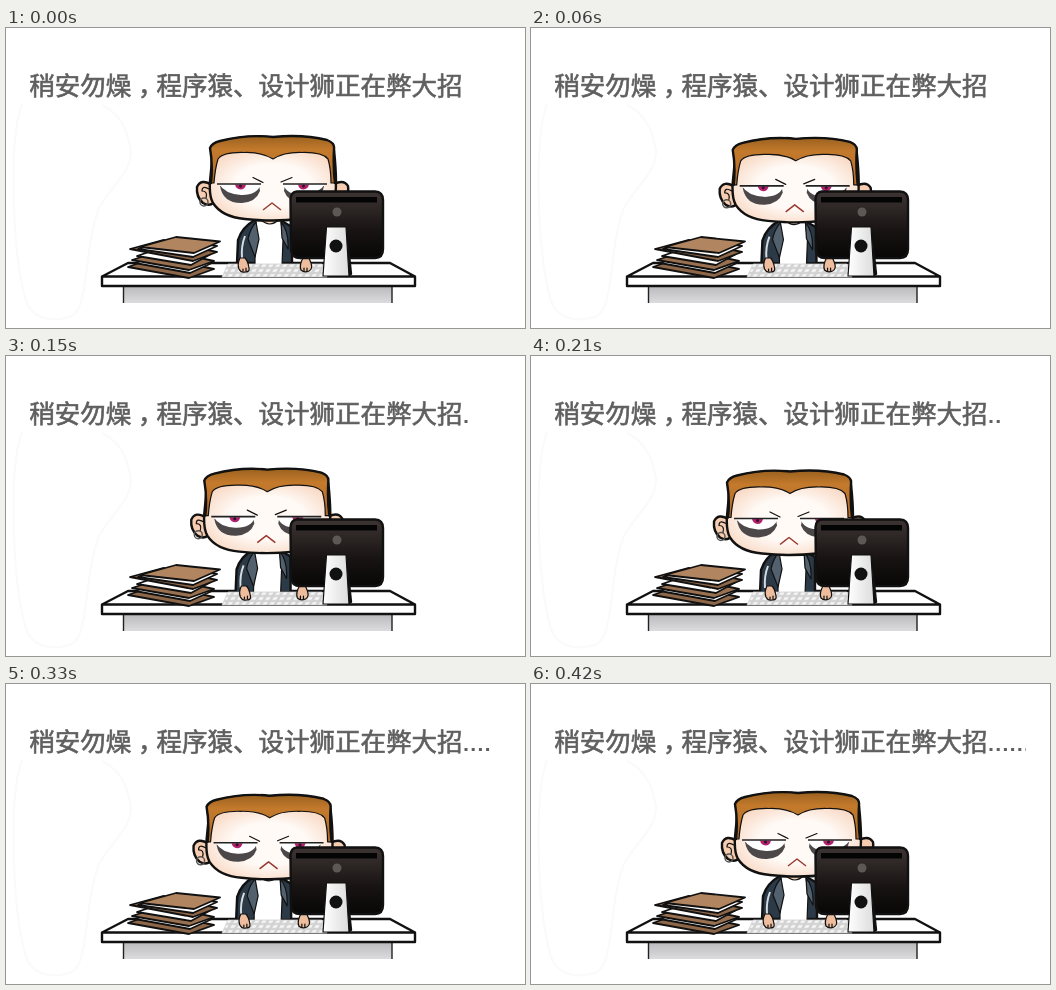
An HTML page for the animation above (450 ms loop, 519x300 px).

```html
<!DOCTYPE html>
<html lang="zh-CN">
<head>
<meta charset="utf-8">
<style>
html, body { margin: 0; height: 100%; overflow: hidden; background: #fff; }
svg { display: block; width: 519px; height: 300px; }
text { font: 500 25.5px "Noto Sans CJK SC", "Noto Sans CJK", sans-serif; fill: #5f5f5f; stroke: #5f5f5f; stroke-width: .65px; }
.ink, .thin { stroke: #111; stroke-linejoin: round; stroke-linecap: round; }
.ink { stroke-width: 2.4; }
.thin { stroke-width: 1.2; }
</style>
</head>
<body>
<svg viewBox="0 0 519 300" fill="none">
  <defs>
    <linearGradient id="hair" x2="0" y2="1">
      <stop stop-color="#9a611f"/><stop offset=".3" stop-color="#c47a2c"/><stop offset="1" stop-color="#b36a28"/>
    </linearGradient>
    <radialGradient id="skin" cx=".5" cy=".5" r=".6">
      <stop offset=".5" stop-color="#fffaf6"/><stop offset="1" stop-color="#f8d6c0"/>
    </radialGradient>
    <linearGradient id="panel" x2="0" y2="1">
      <stop stop-color="#b9b9bb"/><stop offset="1" stop-color="#dcdcde"/>
    </linearGradient>
    <linearGradient id="screen" x2="0" y2="1">
      <stop stop-color="#3d3533"/><stop offset=".6" stop-color="#171312"/><stop offset="1" stop-color="#080606"/>
    </linearGradient>
    <linearGradient id="stand"><stop stop-color="#fff"/><stop offset="1" stop-color="#dcdcdc"/></linearGradient>
    <pattern id="keys" width="7" height="5" patternUnits="userSpaceOnUse" patternTransform="skewX(-30)">
      <path fill="#d2d2d2" d="M0 0h7v5H0z"/><path fill="#f4f4f4" d="M1 1h4v3H1z"/>
    </pattern>
    <clipPath id="textArea"><path d="M0 30H495V85H0z"/></clipPath>
  </defs>

  <path stroke="#fafafa" stroke-width="2" d="M16 76C3 110 6 215 18 266C23 290 43 296 66 288C84 276 77 222 93 180C106 156 125 146 125 123C121 98 112 85 96 77"/>

  <g clip-path="url(#textArea)">
    <text x="23.200" y="67">稍安勿燥</text>
    <text x="132" y="67">，</text>
    <text x="150.500" y="67">程序猿、设计狮正在弊大招</text>
    <g id="dots" fill="#5f5f5f"></g>
  </g>

  <path fill="url(#panel)" d="M117 258H386V275H117z"/>
  <path stroke="#222" stroke-width="1.400" d="M117.500 259V275M386 259V275"/>
  <path class="ink" fill="#fff" d="M122 235H384L409 248.500V258H96V248.500zM96 248.500H409"/>

  <g class="ink" style="stroke-width: 1.8px">
    <path fill="#8d6748" d="M122 239L150 229L208 241L183 250z"/>
    <path fill="#fff" d="M129 235L155 226L206 235L184 245z"/>
    <path fill="#9a7150" d="M126 232L157 222L208 233L183 242z"/>
    <path fill="#fff" d="M131 228L158 219L205 226L185 237z"/>
    <path fill="#8d6748" d="M124 221L157 212L211 224L187 233z"/>
    <path fill="#fff" d="M132 221L166 211L211 218L187 229z"/>
    <path fill="#b18560" d="M134 219L170 209L214 213.500L188 225z"/>
  </g>

  <g id="body">
    <path class="ink" fill="#2c3947" d="M249 192Q236 199 232 212L231 235H250L256 197zM274 192L286 199V235H274z"/>
    <path fill="#fff" class="thin" d="M250 193H275L277 212L276 237H249L249 214z"/>
    <path fill="#f3d2b8" class="thin" d="M254 191H273Q264 201 254 191z"/>
    <path stroke="#d3dce0" stroke-width="2" d="M239 208Q235 218 236 230"/>
    <path class="thin" fill="#52616d" d="M250 194Q244 201 242 211L249 229L253 211zM275 194Q283 203 282 221L276 210z"/>
  </g>

  <path fill="url(#keys)" stroke="#cdcdcd" stroke-width=".7" d="M222 236H316L321 249H216z"/>
  <g id="leftHand">
    <path class="thin" fill="#eebd9e" d="M234 230Q231 236 233 241Q235 245 239 244Q244 244 243 240Q242 233 239 230z"/>
    <path class="thin" d="M237 241V243M240 240V243"/>
  </g>
  <g id="rightHand">
    <path class="thin" fill="#eebd9e" d="M297 230Q293 237 295 242Q298 245 303 243Q307 241 305 235L303 230z"/>
    <path class="thin" d="M298 240V243M301 240V243"/>
  </g>

  <g id="head">
    <path class="ink" fill="#f6cdb0" d="M206 157Q195 150 191 159Q190 169 197 175Q204 179 208 174z"/>
    <path class="thin" d="M203 161Q196 157 196 163Q202 163 200 170"/>
    <circle cx="198" cy="174" r="4" stroke="#555" stroke-width="1.500"/>
    <path class="ink" fill="#f6cdb0" d="M328 156Q338 151 342 158Q344 170 329 178z"/>
    <path class="ink" fill="url(#skin)" d="M207 122L204 153Q203 168 207 175Q216 189 239 191Q267 194 294 191Q322 188 328 174Q332 160 328 122z"/>
    <path class="thin" fill="url(#hair)" d="M205 155Q207 137 204 120Q206 115 214 113Q241 106 267 109Q297 106 321 112Q329 115 328 121Q327 140 329 155L325 155Q325 141 322 131Q316 124 296 124.500Q278 124 267 131Q256 124 238 124.500Q217 124 212 131Q209 141 208 155z"/>
    <path class="ink" d="M205 155Q207 137 204 120Q206 115 214 113Q241 106 267 109Q297 106 321 112Q329 115 328 121Q327 140 329 155"/>
    <g id="eye">
      <path fill="#4c4748" d="M214 158Q217 175.500 236 175Q250 174 254 163L253 157z"/>
      <path fill="#fff" d="M213 156H255Q251 167.500 235 167Q219 166 213 156z"/>
      <path fill="#b3206f" d="M229 156.500H240Q239 161.500 234.500 161.500Q230 161 229 156.500z"/>
      <circle cx="234.500" cy="158" r="1.500" fill="#351027"/>
      <path stroke="#222" stroke-width="1.600" d="M211 156H255"/>
    </g>
    <use href="#eye" transform="matrix(-1 0 0 1 532 0)"/>
    <path class="thin" d="M247 149.500L257 154.500M275 154L286 149.500"/>
    <path stroke="#9a3a30" stroke-width="1.500" stroke-linejoin="round" d="M257 182L266 175L275 182"/>
  </g>

  <path class="ink" fill="url(#screen)" d="M291 163.500H369Q377 164 377 172V221Q377 230 369 230H294Q286 230 285 222L284.500 171Q285 164 291 163.500z"/>
  <path fill="#050404" d="M290 169H371V174.500H290z"/>
  <circle cx="331" cy="184" r="4.500" fill="#5d5856"/>
  <path class="ink" fill="#111" d="M340 200L345 246L341 248z"/>
  <path class="thin" fill="url(#stand)" d="M320.500 199H340L343 248H317z"/>
  <circle cx="330" cy="218" r="6.500" fill="#111"/>
</svg>
<script>
const LOOP = 450, STEP = 30;
const byId = id => document.getElementById(id);
const shift = (id, x, y) => byId(id).setAttribute("transform", `translate(${x} ${y})`);

function draw(now) {
  const step = Math.floor(now % LOOP / STEP);
  const lean = 1 - Math.abs(step - 7) / 7;
  shift("head", -8 * lean, 6.5 * lean);
  shift("body", -2 * lean, 2 * lean);
  shift("leftHand", 2 * lean, 0);
  shift("rightHand", -5 * lean, 0);

  const count = Math.max(0, Math.floor((step - 2) / 2));
  byId("dots").innerHTML = Array.from({ length: count }, (_, i) =>
    `<rect x="${458.5 + 7.2 * i}" y="64" width="3" height="3"/>`).join("");
}

function tick() {
  draw(performance.now());
  requestAnimationFrame(tick);
}
tick();
</script>
</body>
</html>
```
